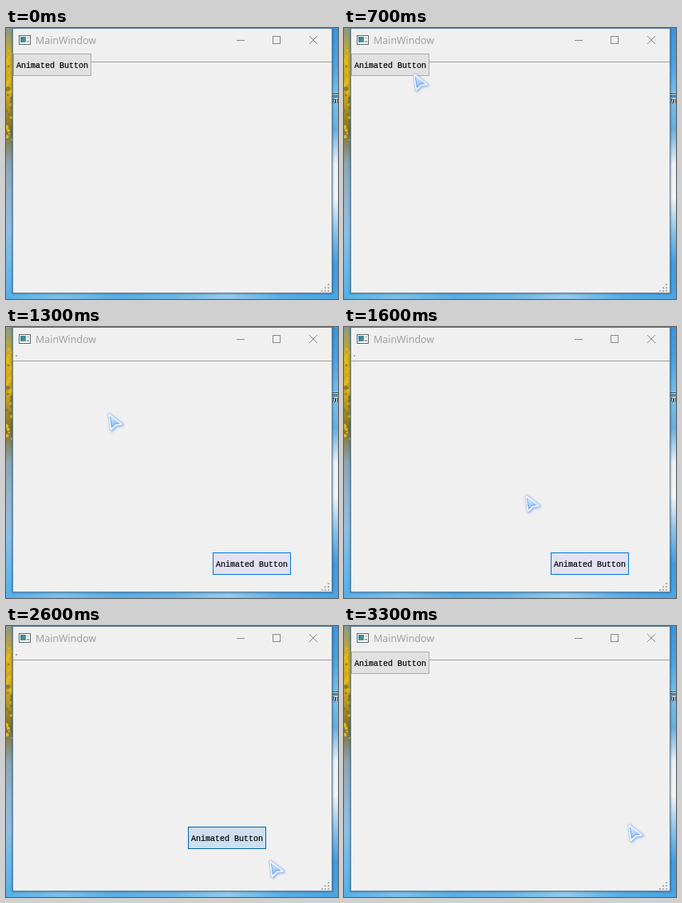
These frames come from a looping animation (416 by 339 pixels, 3.8 s). An HTML page with a canvas:

```html
<!DOCTYPE html>
<html lang="en">
<head>
<meta charset="utf-8">
<title>Animated Button</title>
<style>
  html, body { margin: 0; width: 100%; height: 100%; overflow: hidden; }
  canvas { display: block; }
</style>
</head>
<body>
<canvas id="stage" width="416" height="339"></canvas>
<script>
const ctx = document.getElementById('stage').getContext('2d');
const LOOP = 3800, STEP = 100, TRAVEL = 241;

const clamp = v => Math.max(0, Math.min(1, v));
const progress = (t, start, duration) => clamp((t - start) / duration);
const smooth = k => k * k * (3 - 2 * k);
const mix = (a, b, k) => a + (b - a) * k;

function rect(color, x, y, w, h) {
  ctx.fillStyle = color;
  ctx.fillRect(x, y, w, h);
}

function frame(color, x, y, w, h) {
  ctx.strokeStyle = color;
  ctx.lineWidth = 1;
  ctx.strokeRect(x + .5, y + .5, w - 1, h - 1);
}

function strokePath(color, width, path) {
  ctx.strokeStyle = color;
  ctx.lineWidth = width;
  ctx.stroke(new Path2D(path));
}

// Evenly spaced colours along a line
function gradient(x1, y1, x2, y2, ...colors) {
  const g = ctx.createLinearGradient(x1, y1, x2, y2);
  colors.forEach((color, i) => g.addColorStop(i / (colors.length - 1), color));
  return g;
}

function seededRandom(seed) {
  return () => (seed = seed * 16807 % 2147483647) / 2147483647;
}

function drawWallpaper() {
  rect(gradient(0, 0, 0, 339, '#8a9a86', '#d9ae12', '#c9a51c', '#80712a', '#8fa5b0',
    '#93b4cc', '#8fbfe0', '#6fb8e8', '#55b0e8'), 0, 0, 9, 339);
  const random = seededRandom(11);
  for (let y = 28; y < 142; y += 4) {
    ctx.fillStyle = random() < .6 ? '#e3b81c' : '#8b7b2a';
    ctx.beginPath();
    ctx.arc(random() * 8, y, 1 + random() * 2, 0, 7);
    ctx.fill();
  }
  rect(gradient(0, 0, 0, 339, '#3b95dc', '#4aa2e2', '#78c2e8', '#6aaede', '#eaf2f6',
    '#f4f6f7', '#8cc4ea', '#3f9ae0', '#4aa4e4'), 408, 0, 8, 339);
  rect(gradient(0, 0, 416, 0, '#55b0e8', '#7cc0e8', '#58aee4', '#6ab6e6', '#94cbec',
    '#58aee6', '#4aa4e4'), 0, 331, 416, 8);
  // Clipped desktop label
  const label = 'M409 83.5H416M408 87.5H416M412.5 88L410.5 94M414.5 88V94';
  strokePath('#26445d', 3, label);
  strokePath('#fff', 1, label);
  // Window shadow
  rect('rgba(20,40,60,.16)', 6, 0, 2, 333);
  rect('rgba(20,40,60,.16)', 409, 0, 2, 333);
  rect('rgba(20,40,60,.16)', 8, 332, 401, 2);
}

function drawWindow() {
  rect('#f0f0f0', 8, 0, 401, 332);
  frame('#587c9d', 8, 0, 401, 332);

  rect('#fff', 16, 9, 15, 12);
  frame('#5a666c', 16, 9, 15, 12);
  rect(gradient(18, 12, 24, 18, '#3c7caa', '#43a078'), 18, 11, 7, 7);
  rect('#9aa5aa', 26, 12, 3, 1);
  rect('#9aa5aa', 26, 16, 3, 2);

  ctx.font = '12.4px "Noto Sans", sans-serif';
  ctx.fillStyle = '#a0a0a0';
  ctx.fillText('MainWindow', 37, 20);

  rect('#888', 289, 15, 10, 1);
  frame('#888', 334, 10, 10, 10);
  strokePath('#888', 1, 'M380 10L390 20M390 10L380 20');

  rect('#a0a0a0', 9, 42, 399, 1);
  rect('#aaa', 12, 35, 2, 2);
  for (let row = 0; row < 3; row++)
    for (let col = 0; col <= row; col++)
      rect('#b0b0b0', 403 - col * 4, 320 + row * 4, 2, 2);
}

function drawButton(t) {
  const away = progress(t, 970, TRAVEL) - progress(t, 2570, TRAVEL);
  const x = Math.round(mix(9, 259, away)), y = Math.round(mix(32, 282, away));

  // Each look fades in over the one before
  const look = (fill, border, start, duration) => {
    ctx.globalAlpha = progress(t, start, duration);
    rect(fill, x, y, 98, 28);
    frame(border, x, y, 98, 28);
  };
  look('#e1e1e1', '#adadad', -1, 1);
  look('#e5f1fb', '#0078d7', 700, 200);
  look('#cce4f7', '#005499', 850, 50);
  look('#e1e1f2', '#0078d7', 1000, 300);
  look('#cddff1', '#0062a8', 2500, 100);
  look('#e1e1e1', '#adadad', 2600, 350);
  ctx.globalAlpha = 1;

  ctx.font = '10px "Liberation Mono", monospace';
  ctx.fillStyle = ctx.strokeStyle = '#000';
  ctx.lineWidth = .2;
  ctx.fillText('Animated Button', x + 4, y + 18);
  ctx.strokeText('Animated Button', x + 4, y + 18);
}

function cursorAt(t) {
  let x = 362, y = 190;
  const glide = (start, end, toX, toY, bend = 0) => {
    const k = smooth(progress(t, start, end - start));
    x = mix(x, toX, k) + bend * Math.sin(Math.PI * k);
    y = mix(y, toY, k);
  };
  glide(300, 700, 88, 57);
  glide(1000, 2000, 331, 293, -19);
  glide(2600, 2950, 331, 264);
  glide(3100, 3300, 357, 248);
  return [Math.round(x), Math.round(y)];
}

function drawCursor(t) {
  if (t < 100) return;
  const outline = 'M0 1L16 13.5L8.5 14.5L2.5 20.5Z';
  ctx.save();
  ctx.translate(...cursorAt(t));
  ctx.lineJoin = 'round';
  ctx.shadowColor = 'rgba(90,140,225,.7)';
  ctx.shadowBlur = 3;
  ctx.shadowOffsetX = ctx.shadowOffsetY = 1;
  strokePath('#b4cdf3', 3, outline);
  ctx.shadowColor = 'transparent';
  ctx.fillStyle = gradient(0, 2, 7, 18, '#e8f3ff', '#b8d8f9', '#8bb8ef');
  ctx.fill(new Path2D(outline));
  strokePath('#f4f9ff', 1.5, outline);
  strokePath('#7ba6e8', 1, 'M1.5 4L3.5 17L7.5 13L12 12.5');
  ctx.restore();
}

function render(elapsed) {
  const t = Math.floor((elapsed % LOOP) / STEP) * STEP;
  drawWallpaper();
  drawWindow();
  drawButton(t);
  drawCursor(t);
}

const start = performance.now();
function tick() {
  render(performance.now() - start);
  requestAnimationFrame(tick);
}
tick();
</script>
</body>
</html>
```
